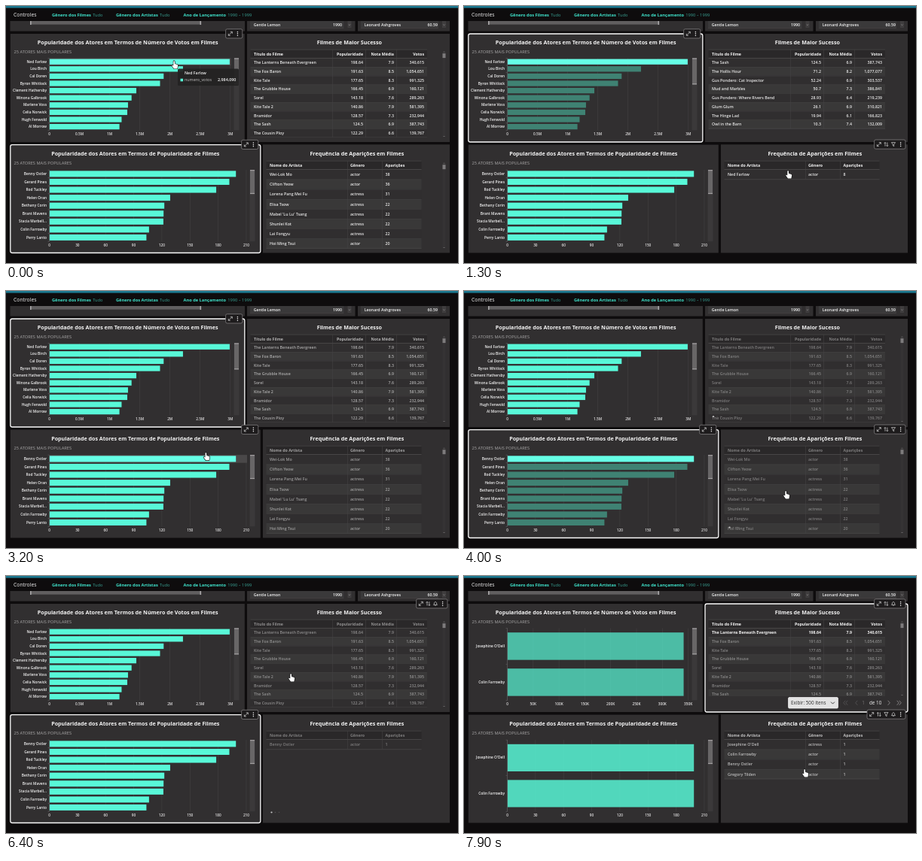
Recreate the animation shown at these times as an HTML page with a canvas. Size 600 px wide and 342 px high, loop 8 s.

```html
<!DOCTYPE html>
<html lang="pt">
<head>
<meta charset="utf-8">
<title>Painel de filmes</title>
<style>
html, body { margin: 0; width: 100%; height: 100%; overflow: hidden; background: #0e0c0d; }
canvas { display: block; width: 600px; height: 342px; }
</style>
</head>
<body>
<canvas id="stage"></canvas>
<script>
const LOOP = 8000;
const canvas = document.getElementById('stage');
const ctx = canvas.getContext('2d');
const dpr = window.devicePixelRatio || 1;
canvas.width = 600 * dpr;
canvas.height = 342 * dpr;

const C = {
  bg: '#0e0c0d', panel: '#312f30', white: '#f4f4f4', soft: '#a9a8a8', teal: '#58f8d8',
  hot: '#66ffe6', off: '#3f8273', grid: '#434142', line: '#4b494a', icon: '#d8d8d8'
};

// ---------- data ----------
const star = 'Ned Farlow', composer = 'Benny Ostler';
const split = s => s.split('\n').map(r => r.split('|'));

const films = split(`The Lanterns Beneath Evergreen|198.64|7.9|340,615
The Fox Baron|191.63|8.5|1,054,651
Kite Tale|177.65|8.3|991,325
The Grubble House|166.45|6.9|160,121
Sorel|143.18|7.6|289,263
Kite Tale 2|140.86|7.9|581,395
Bramidor|128.57|7.3|232,944
The Sash|124.5|6.9|387,743
The Cousin Ploy|122.29|6.6|139,767`);
const starFilms = split(`The Sash|124.5|6.9|387,743
The Hollis Hour|71.2|8.2|1,077,077
Gus Pondero: Cat Inspector|52.24|6.9|303,537
Mud and Marbles|50.7|7.3|386,841
Gus Pondero: Where Rivers Bend|28.93|6.4|219,239
Glum Glum|26.1|6.9|310,821
The Hinge Lad|19.94|6.1|166,823
Owl in the Barn|10.3|7.4|132,009`);
const people = split(`Wei-Lok Mo|actor|38
Clifton Yeow|actor|36
Lorena Pang Mei Fu|actress|31
Elisa Tsow|actress|22
Mabel 'Lu Lu' Tsang|actress|22
Shunlei Kot|actress|22
Lai Fongyu|actress|22
Hoi Ming Tsui|actor|20`);
const cast = split(`Josephine O'Dell|actress|1
Colin Farrowby|actor|1
${composer}|actor|1
Gregory Tilden|actor|1`);

const votes = [[star, 2.984], ['Lou Birch', 2.21], ['Cal Doren', 1.89], ['Byron Whitlock', 1.83],
  ['Clement Hathersby', 1.437], ['Winona Galbrook', 1.358], ['Marlene Voss', 1.299],
  ['Celia Norwick', 1.287], ['Hugh Fenwold', 1.193], ['Al Morrow', 1.157]];
const fame = [[composer, 198.64], ['Gerard Pines', 191.63], ['Rod Tuckley', 177.65], ['Helen Oran', 128.57],
  ['Bethany Corin', 122.3], ['Brant Mavens', 121.5], ['Stacia Marbell...', 121.3],
  ['Colin Farrowby', 106], ['Perry Lanto', 103.2]];
const pair = v => cast.slice(0, 2).map(r => [r[0], v]);

// ---------- timeline ----------
const filmStates = [[0, films], [900, starFilms], [3050, films], [4450, films.slice(0, 1)], [6350, films]];
const peopleStates = [[0, people], [950, [[star, 'actor', '8']]], [3100, people],
  [4500, [[composer, 'actor', '1']]], [6550, people], [7700, cast]];
const filmLoads = [[200, 900], [2500, 3050], [3500, 4450], [5800, 6350]];
const peopleLoads = [[200, 950], [2500, 3100], [3500, 4500], [5800, 6550], [7300, 7700]];
const focusStates = [[0, 'BL'], [200, 'TL'], [3500, 'BL'], [7300, 'TR']];
const path = [[0, 223, 79], [200, 223, 79], [500, 325, 174], [900, 425, 222], [1300, 430, 225],
  [1800, 405, 105], [2250, 279, 76], [2550, 279, 76], [3250, 265, 223], [3500, 265, 223],
  [4000, 427, 272], [4350, 430, 240], [4750, 400, 80], [4950, 390, 82], [5300, 292, 226],
  [5850, 292, 226], [6400, 378, 136], [6850, 372, 77], [7350, 372, 77], [7900, 452, 263]];

const clamp = v => Math.max(0, Math.min(1, v));
const ease = v => v * v * (3 - 2 * v);
const within = (t, a, b) => t >= a && t < b;
const at = (states, t) => states.filter(s => s[0] <= t).pop()[1];

function pointer(t) {
  const i = path.findIndex(p => p[0] > t);
  if (i < 0) return path[path.length - 1].slice(1);
  const [a, b] = [path[i - 1], path[i]];
  const k = ease((t - a[0]) / (b[0] - a[0]));
  return [a[1] + (b[1] - a[1]) * k, a[2] + (b[2] - a[2]) * k];
}

// Text fades down when a query starts and back up when its rows arrive.
const DIM = 0.42;
function opacity(loads, t) {
  let o = 1;
  for (const [start, done] of loads) {
    if (within(t, start, done)) o = 1 - (1 - DIM) * clamp((t - start) / 150);
    else if (within(t, done, done + 350)) o = DIM + (1 - DIM) * (t - done) / 350;
  }
  return o;
}
const loading = (loads, t) => loads.some(([a, b]) => within(t, a + 150, b));

// ---------- drawing helpers ----------
function rect(x, y, w, h, fill) {
  ctx.fillStyle = fill;
  ctx.fillRect(x, y, w, h);
}
function frame(x, y, w, h, r, fill, stroke, lw = 0.6) {
  ctx.beginPath();
  ctx.roundRect(x, y, w, h, r);
  if (fill) { ctx.fillStyle = fill; ctx.fill(); }
  if (stroke) { ctx.strokeStyle = stroke; ctx.lineWidth = lw; ctx.stroke(); }
}
function text(s, x, y, size, color = C.white, weight = 400, align = 'left') {
  ctx.font = `${weight} ${size}px "Open Sans", "Noto Sans", sans-serif`;
  ctx.textAlign = align;
  ctx.textBaseline = 'middle';
  ctx.fillStyle = color;
  ctx.fillText(s, x, y + 0.6);
}
function lines(runs, color, lw = 0.7, close) {
  ctx.beginPath();
  for (const run of runs) run.forEach(([x, y], i) => i ? ctx.lineTo(x, y) : ctx.moveTo(x, y));
  if (close) ctx.closePath();
  ctx.strokeStyle = color;
  ctx.lineWidth = lw;
  ctx.stroke();
}
function dot(x, y, r, color) {
  ctx.beginPath();
  ctx.arc(x, y, r, 0, 7);
  ctx.fillStyle = color;
  ctx.fill();
}
function thumb(x, y, w, h) {
  rect(x, y, w, h, '#686667');
  rect(x, y, w, 1.2, '#a2a0a1');
  rect(x, y + h - 1.2, w, 1.2, '#a2a0a1');
}

// ---------- pieces ----------
const panels = {
  TL: [5.8, 37, 311, 144], TR: [320, 37, 269, 144],
  BL: [5.8, 184.6, 332, 143.9], BR: [341, 184.3, 248, 144.2]
};

function header() {
  rect(0, 0, 600, 2.6, '#1b7890');
  text('Controles', 10, 11.3, 6.8);
  const items = [['Gênero dos Filmes', 'Tudo', 61], ['Gênero dos Artistas', 'Tudo', 146],
    ['Ano de Lançamento', '1990 – 1999', 235.5]];
  for (const [name, value, x] of items) {
    text(name, x, 11.6, 5.7, '#3fe3cb', 700);
    text(value, x + ctx.measureText(name).width + 2.3, 11.6, 5.7, '#38a193');
  }
  rect(5.5, 20, 311.5, 13.5, C.panel);
  rect(32, 20, 227, 4.6, '#615f60');
  rect(32, 20, 1.6, 5, '#aaa8a9');
  rect(257.5, 20, 1.6, 5, '#aaa8a9');
  for (const [x, w, name, value, right] of [[320, 143.5, 'Gentle Lemon', '1990', 446], [467, 122, 'Leonard Ashgroves', '60.59', 573]]) {
    rect(x, 20, w, 13.5, C.panel);
    rect(x + 4, 20, w - 19, 9, '#3a393a');
    rect(x + 4, 29, w - 19, 0.6, C.line);
    rect(x + w - 10, 20, 5, 9, '#3f3d3e');
    lines([[[x + w - 8.7, 24.5], [x + w - 7.5, 25.7], [x + w - 6.3, 24.5]]], '#9a9899');
    text(name, x + 8.7, 24.6, 5.27, C.white, 600);
    text(value, right, 24.6, 5.27, C.white, 600, 'right');
  }
}

function chart(o) {
  const { x0, y0, h, px, rows, fade, picked, hover } = o;
  const step = h / rows.length;
  text(o.title, o.mid, o.top + 11.6, 7.14, C.white, 700, 'center');
  text('25 ATORES MAIS POPULARES', 10.5, o.top + 24.4, 5.7, C.soft);
  o.ticks.forEach((label, i) => {
    const x = x0 + i * o.gap;
    rect(x - 0.3, y0, 0.6, h, i ? C.grid : '#6a6869');
    text(label, x, y0 + h + 5.2, 4.75, '#e4e3e3', 600, 'center');
  });
  for (let i = 0; i <= rows.length; i++) rect(x0 - 2, y0 + i * step - 0.25, 2, 0.5, '#656364');
  if (hover !== undefined) rect(x0, y0 + hover * step, o.end - x0, step, '#4a4849');
  const lit = picked === undefined ? hover : picked;
  rows.forEach(([name, value], i) => {
    const y = y0 + (i + 0.5) * step, bar = step * 0.76;
    text(name, 54, y - 0.3, 4.83, C.white, 600, 'right');
    ctx.globalAlpha = fade;
    rect(x0 + 0.4, y - bar / 2, value * px, bar, lit === i ? C.hot : picked === undefined ? C.teal : C.off);
    ctx.globalAlpha = 1;
  });
  rect(o.bar, y0, 7, h, '#3b393a');
  thumb(o.bar + 0.5, y0, 6, o.grip);
}

function table(o) {
  const { x, y, w, rowH, cols, rows, alpha, chosen } = o;
  const headH = 11.3;
  text(o.title, o.mid, o.top, 7.14, C.white, 700, 'center');
  ctx.save();
  ctx.beginPath();
  ctx.rect(x - 1, y - 1, w + 2, o.clip - y + 1);
  ctx.clip();
  const bottom = y + headH + rows.length * rowH;
  rect(x, y, w, headH, '#2a2829');
  rows.forEach((r, i) => {
    const top = y + headH + i * rowH;
    rect(x, top, w, rowH, i % 2 ? '#393838' : '#302e2f');
    rect(x, top, w, 0.5, '#444243');
  });
  lines([y, y + headH, bottom].map(v => [[x, v], [x + w, v]]), '#565455', 0.5);
  for (const c of o.rules) rect(c, y, 0.5, bottom - y, '#474546');
  const row = (cells, cy, weight, a) => {
    ctx.globalAlpha = a;
    cells.forEach((s, i) => text(s, cols[i][1], cy, 5.27, C.white, weight, cols[i][2]));
    ctx.globalAlpha = 1;
  };
  row(cols.map(c => c[0]), y + headH / 2, 700, alpha);
  rows.forEach((r, i) => {
    const marked = chosen === i;
    row(r, y + headH + (i + 0.5) * rowH, marked ? 700 : 600,
      marked ? 1 : chosen === undefined ? alpha * 0.95 : 0.45);
  });
  ctx.restore();
  if (rows.length > 7 && rows !== starFilms) {
    rect(o.bar, y + 4, 4, o.clip - y - 5, '#353334');
    rect(o.bar, y + 5, 4, 6, '#7d7b7c');
    lines([[[o.bar + 1, y + 3.6], [o.bar + 2, y + 2.6], [o.bar + 3, y + 3.6]],
      [[o.bar + 1, o.clip - 2], [o.bar + 2, o.clip - 1], [o.bar + 3, o.clip - 2]]], '#918f90', 0.6);
  }
}

function loader(x, y, t) {
  for (let i = 0; i < 3; i++) {
    const k = 0.5 + 0.5 * Math.cos(2 * Math.PI * ((t - 500) / 1180 - i / 3));
    dot(x + i * 5, y, 0.6 + 0.5 * k, `rgba(225,225,225,${0.15 + 0.7 * k * k})`);
  }
}

const icons = {
  expand(x, y) {
    lines([[[x - 2.5, y + 2.5], [x + 2.5, y - 2.5]], [[x, y - 2.5], [x + 2.5, y - 2.5], [x + 2.5, y]],
      [[x - 2.5, y], [x - 2.5, y + 2.5], [x, y + 2.5]]], C.icon);
  },
  sort(x, y) {
    lines([[[x - 1.4, y + 2.6], [x - 1.4, y - 2.6]], [[x - 2.7, y - 1.2], [x - 1.4, y - 2.6], [x - 0.2, y - 1.2]],
      [[x + 1.5, y - 2.6], [x + 1.5, y + 2.6]], [[x + 0.3, y + 1.2], [x + 1.5, y + 2.6], [x + 2.7, y + 1.2]]], C.icon);
  },
  filter(x, y) {
    lines([[[x - 2.6, y - 2.5], [x + 2.6, y - 2.5], [x + 0.7, y], [x + 0.7, y + 2.6], [x - 0.7, y + 1.7], [x - 0.7, y]]], C.icon, 0.7, true);
  },
  bell(x, y) {
    lines([[[x - 2.5, y + 1.6], [x - 1.7, y + 0.6], [x - 1.7, y - 1], [x, y - 2.6], [x + 1.7, y - 1],
      [x + 1.7, y + 0.6], [x + 2.5, y + 1.6]]], C.icon, 0.7, true);
    rect(x - 0.6, y + 2, 1.2, 0.8, C.icon);
  },
  more(x, y) {
    for (const d of [-2.4, 0, 2.4]) dot(x, y + d, 0.75, '#f0f0f0');
  }
};

function toolbar(id, t) {
  const [x, y, w] = panels[id];
  let set = ['expand', 'more'];
  if (id === 'TR') set = ['expand', 'sort', 'bell', 'more'];
  if (id === 'BR') set = ['expand', 'sort', 'filter', ...(t > 7300 ? ['bell'] : []), 'more'];
  const width = set.length * 9.6 + 3, left = x + w - 3 - width;
  frame(left, y - 6.3, width, 12.2, 2, '#1d1b1c', '#8b898a', 0.7);
  set.forEach((name, i) => icons[name](left + 6.2 + i * 9.6, y - 0.2));
}

function tooltip(x, y, name, field, value, { w = 81, shade = 0.94, key = C.teal } = {}) {
  frame(x, y, w, 22.5, 1.5, `rgba(36,34,35,${shade})`);
  text(name, x + 9, y + 5.8, 5.27, C.white, 600);
  rect(x + 3.5, y + 13.2, 3.6, 3.6, key);
  text(field, x + 9, y + 14.8, 5.4, '#c5c4c4');
  text(value, x + w - 3.6, y + 14.8, 5.4, C.white, 600, 'right');
}

function pager() {
  rect(322, 160, 264, 19, C.panel);
  frame(430.5, 161.5, 66, 14.5, 1.5, '#e3e3e3', '#f5f5f5', 0.7);
  text('Exibir: 500 itens', 434, 168.4, 6.3, '#2b2b2b');
  lines([[[487, 167.6], [489.5, 170.1], [492, 167.6]]], '#333', 0.9);
  const arrow = (x, d, color) => lines([[[x - d, 165.8], [x + d, 168.8], [x - d, 171.8]]], color, 0.8);
  for (const x of [505, 508, 521]) arrow(x, -1.3, '#595758');
  text('1', 530, 168.4, 6.3, '#777576', 400, 'center');
  text('de 10', 538, 168.4, 6.3);
  for (const x of [564, 576, 579]) arrow(x, 1.3, '#979596');
}

function cursor(x, y, hand) {
  const shape = hand
    ? [[-0.6, -5.8], [0.8, -5.8], [1.2, -2], [4.6, -1], [5.2, 0.2], [4.4, 4.4], [0, 4.4], [-2.8, 0.4], [-2.2, -0.4], [-0.8, 0.5]]
    : [[-1, -4], [-1, 4.6], [0.9, 3], [2.2, 6], [3.5, 5.4], [2.3, 2.6], [4.8, 2.4]];
  ctx.lineJoin = 'round';
  lines([shape.map(([a, b]) => [x + a, y + b])], '#111', 1.2, true);
  ctx.fillStyle = '#fff';
  ctx.fill();
}

// ---------- scene ----------
function inside([x, y, w, h], px, py) {
  return px >= x && px <= x + w && py >= y && py <= y + h;
}

function draw(t) {
  ctx.setTransform(dpr, 0, 0, dpr, 0, 0);
  rect(0, 0, 600, 342, C.bg);
  header();
  const [mx, my] = pointer(t);
  const focus = at(focusStates, t);
  for (const id in panels) rect(...panels[id], C.panel);

  const filtered = t >= 7650;
  const fadeIn = (start, span) => t < 7300 ? 1 : t < 7650 ? 0.5 : clamp(0.5 + (t - start) / span);
  chart({
    title: 'Popularidade dos Atores em Termos de Número de Votos em Filmes', mid: 161.7, top: 37,
    x0: 57.5, y0: 69.4, h: 96, end: 298.5, bar: 302.5, grip: 35,
    ticks: (filtered ? '0 50K 100K 150K 200K 250K 300K 350K' : '0 0.5M 1M 1.5M 2M 2.5M 3M').split(' '),
    gap: filtered ? 34.3 : 40.05, px: filtered ? 0.686 : 80.1,
    rows: filtered ? pair(340.615) : votes, fade: fadeIn(7700, 1000),
    picked: within(t, 200, 2500) ? 0 : undefined,
    hover: t < 280 || within(t, 2150, 2620) ? 0 : within(t, 400, 600) ? 1 : undefined
  });
  chart({
    title: 'Popularidade dos Atores em Termos de Popularidade de Filmes', mid: 171.8, top: 184.5,
    x0: 57.5, y0: 218.1, h: 95.2, end: 320, bar: 323.5, grip: 32,
    ticks: '0 30 60 90 120 150 180 210'.split(' '), gap: 37.35, px: 1.245,
    rows: filtered ? pair(198.64) : fame, fade: fadeIn(7650, 750),
    picked: within(t, 3500, 5800) ? 0 : undefined,
    hover: within(t, 3200, 3600) || within(t, 5250, 5920) ? 0 : undefined
  });

  table({
    title: 'Filmes de Maior Sucesso', mid: 455.8, top: 48.6, x: 324.5, y: 58.1, w: 234.5, rowH: 11.73,
    clip: focus === 'TR' ? 160 : 175, bar: 579.5, rules: [433, 477.5, 518.5],
    cols: [['Título do Filme', 329, 'left'], ['Popularidade', 474, 'right'], ['Nota Média', 515, 'right'], ['Votos', 555, 'right']],
    rows: at(filmStates, t), alpha: opacity(filmLoads, t), chosen: focus === 'TR' ? 0 : undefined
  });
  table({
    title: 'Frequência de Aparições em Filmes', mid: 465.8, top: 196.7, x: 345.5, y: 206.2, w: 206, rowH: 13.15,
    clip: 323, bar: 579.5, rules: [453, 499.5],
    cols: [['Nome do Artista', 350, 'left'], ['Gênero', 457, 'left'], ['Aparições', 503.5, 'left']],
    rows: at(peopleStates, t), alpha: opacity(peopleLoads, t)
  });
  if (loading(filmLoads, t)) loader(331, 167, t);
  if (loading(peopleLoads, t)) loader(352.5, 314.5, t);
  if (focus === 'TR') pager();

  const [fx, fy, fw, fh] = panels[focus];
  frame(fx, fy, fw, fh, 2.5, null, '#fafafa', 1.3);
  // Hover chrome trails the pointer a little.
  const hovered = pointer(Math.max(0, t - 100));
  for (const id in panels) {
    if (id === focus || inside(panels[id], ...hovered)) toolbar(id, t);
  }

  if (t < 300 || within(t, 2150, 2600)) {
    tooltip(mx + 5, my + 4.5, star, 'numero_votos', '2,984,090');
  } else if (t < 600) {
    const k = clamp((t - 300) / 200);
    tooltip(250 + 28 * k, 115 + 30 * k, 'Marlene Voss', 'numero_votos', '1,299,234',
      { shade: 0.94 - 0.4 * k, key: C.off });
  }
  if (within(t, 3250, 3550) || within(t, 5500, 5900)) {
    tooltip(mx + 5.5, my + 4.5, composer, 'popularidade_filme', '198.64', { w: 86 });
  }

  const onRows = inside([324, 70, 235, 100], mx, my) || inside([345, 217, 207, 105], mx, my);
  const onBars = inside([58, 69, 240, 96], mx, my) || inside([58, 218, 247, 95], mx, my);
  cursor(mx, my, (onRows && !within(t, 300, 600)) || onBars);
}

const begin = performance.now();
function tick() {
  draw((performance.now() - begin) % LOOP);
  requestAnimationFrame(tick);
}
tick();
</script>
</body>
</html>
```
